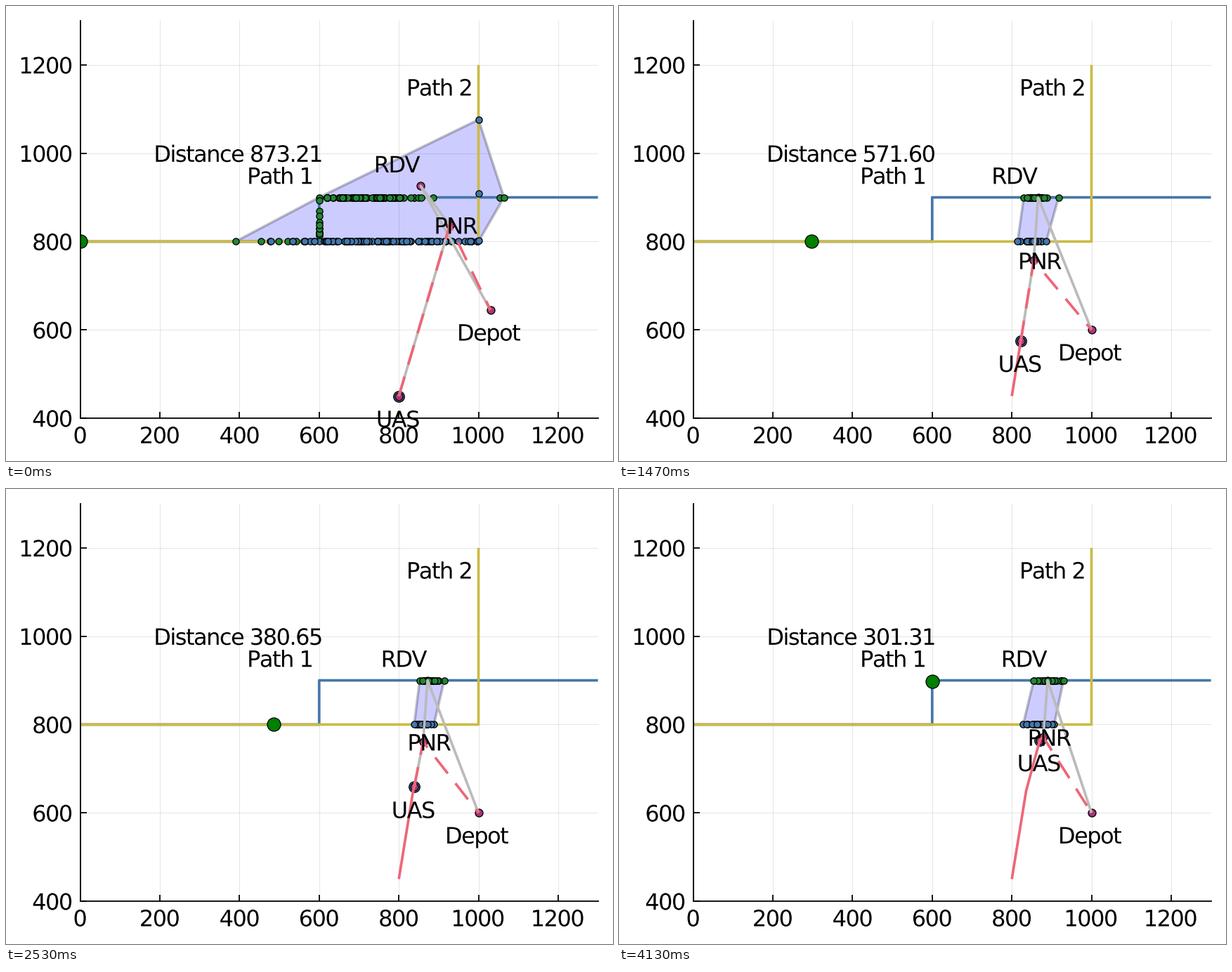
Animation of 864 by 648 pixels, one loop 4190 ms. Source, as a matplotlib script:

```python
import numpy as np
import matplotlib.pyplot as plt
from matplotlib.animation import FuncAnimation
from matplotlib.patches import PathPatch
from matplotlib.path import Path
from matplotlib.textpath import TextPath
from matplotlib.transforms import Affine2D, ScaledTranslation

LOOP_MS, FRAMES = 4190, 63
BLUE, RED, GREEN, YELLOW = "#4477AA", "#EE6677", "#228833", "#CCBB44"
PURPLE, GREY = "#AA3377", "#BBBBBB"
LW = 3.7
SIZE, TRACKING = 32, -1.5
DROP = 12.2  # from a label's middle to its baseline
SLOWDOWN = 32  # step at which both vehicles slow down

plt.rcParams["font.family"] = "DejaVu Sans"
fig = plt.figure(figsize=(12, 9), dpi=72, facecolor="white")
ax = fig.add_axes([105.6 / 864, 61 / 648, 737 / 864, 566 / 648])
ax.set(xlim=(0, 1300), ylim=(400, 1300),
       xticks=range(0, 1201, 200), yticks=range(400, 1201, 200))
ax.set_axisbelow(True)
ax.grid(color="black", alpha=0.1, lw=1)
ax.tick_params(direction="in", length=9, width=1.8,
               labelbottom=False, labelleft=False)
for side in ("top", "right"):
    ax.spines[side].set_visible(False)
for side in ("left", "bottom"):
    ax.spines[side].set_linewidth(1.8)

glyphs = {}


def glyph(char):
    """Outline and advance of one character."""
    if char not in glyphs:
        bar = TextPath((0, 0), "|", size=SIZE).get_extents().x1
        both = TextPath((0, 0), char + "|", size=SIZE).get_extents().x1
        glyphs[char] = TextPath((0, 0), char, size=SIZE), both - bar
    return glyphs[char]


def text_path(text, ha="center"):
    x, parts = 0, []
    for char in text:
        outline, advance = glyph(char)
        if char != " ":
            parts.append(outline.transformed(Affine2D().translate(x, 0)))
        x += advance + TRACKING
    path = Path.make_compound_path(*parts)
    box = path.get_extents()
    anchor = box.x1 if ha == "right" else (box.x0 + box.x1) / 2
    return path.transformed(Affine2D().translate(-anchor, 0))


class Label:
    """Letter-spaced text at a data point plus an offset in pixels."""

    def __init__(self, text, xy=(0, 0), dx=0, dy=0, ha="center"):
        self.offset = dx, dy - DROP
        self.patch = PathPatch(text_path(text, ha), fc="black", ec="none")
        self.move(xy)
        fig.add_artist(self.patch)

    def move(self, xy):
        self.patch.set_transform(
            Affine2D().translate(*self.offset).scale(1 / 72)
            + fig.dpi_scale_trans + ScaledTranslation(*xy, ax.transData))

    def write(self, text):
        self.patch.set_path(text_path(text))


def line(color, **kw):
    return ax.plot([], [], color=color, lw=LW, solid_capstyle="butt",
                   dash_capstyle="butt", solid_joinstyle="round",
                   snap=False, **kw)[0]


def dots(color, size):
    return ax.plot([], [], "o", ms=size, mfc=color, mec="black", mew=1.3,
                   snap=False)[0]


def put(artist, *points):
    artist.set_data(*np.array(points).T)


hull = ax.fill([0, 0, 0], [0, 0, 0], fc=(0, 0, 1, 0.2), ec="none", zorder=1.2)[0]
hull_edge = line("#C0C0C0", zorder=1.1)
path1, path2 = line(BLUE), line(YELLOW)
put(path1, (0, 800), (600, 800), (600, 900), (1300, 900))
put(path2, (0, 800), (1000, 800), (1000, 1200))

ship = dots("green", 19)
ring = dots(BLUE, 15.5)
marks = dots(PURPLE, 11)
greens, blues = dots(GREEN, 9.2), dots(BLUE, 9.2)
route = line(GREY)
trail = line(RED)
retreat = line(RED, linestyle=(0, (29 / LW, 17.7 / LW)))

for v in range(0, 1201, 200):
    Label(str(v), (v, 400), dy=-23.5)
    if v >= 400:
        Label(str(v), (0, v), dx=-12.5, ha="right")
Label("Path 1", (500, 950), dx=1.5)
Label("Path 2", (900, 1150), dx=1.5)
distance = Label("Distance", (400, 1000), dx=-1.4)
rdv_text = Label("RDV", dx=-32, dy=31.4)
pnr_text = Label("PNR", dx=10)
uas_text = Label("UAS", dx=-0.5, dy=-32)
depot_text = Label("Depot", dx=-1, dy=-31.4)


def travelled(step, fast, slow):
    return fast * min(step, SLOWDOWN) + slow * max(step - SLOWDOWN, 0)


def ship_at(step):
    s = travelled(step, 13.5, 8.86)
    return np.array([min(s, 600), 800 + max(s - 600, 0)])


def uas_at(step):
    y = 450 + travelled(step, 5.69, 4.42)
    return np.array([np.interp(y, (450, 650, 765), (800, 836, 870.4)), y])


def on_row(xs, y):
    return [(x, y) for x in xs]


def first_guess(rng):
    """Wide opening spread of candidate points, and its hull."""
    top = np.append(rng.normal(735, 75, 80).clip(620, 886), [600, 1053, 1064])
    side = [(600, y) for y in rng.uniform(810, 895, 11)]
    low = [390, *np.linspace(454, 565, 6)]
    row = rng.normal(750, 120, 100).clip(473, 998)
    g = on_row(top, 900) + side + on_row(low, 800)
    b = on_row(row, 800) + [(1000, 802), (1000, 909), (1000, 1076)]
    outline = [(390, 800), (600, 900), (1000, 1076), (1064, 900), (1000, 800)]
    return g, b, outline


def update(step):
    rng = np.random.default_rng(40 + step)
    target, uas = ship_at(step), uas_at(step)
    if step == 0:
        rdv, pnr, depot = (854.5, 926), (928, 837), (1030, 645)
        g, b, outline = first_guess(rng)
    else:
        drift = 0.75 * max(step - 30, 0)
        x = 866 + drift
        rdv, pnr, depot = (x, 900), (x - 11, 757 + 0.6 * drift), (1000, 600)
        top, row = rng.normal(x - 1, 17, 28), rng.normal(x - 16, 17, 28)
        g, b = on_row(top, 900), on_row(row, 800)
        outline = [(top.min(), 900), (top.max(), 900),
                   (row.max(), 800), (row.min(), 800)]

    hull.set_xy(outline)
    put(hull_edge, *outline, outline[0])
    put(greens, *g)
    put(blues, *b)
    put(ship, target)
    put(ring, uas)
    put(marks, uas, rdv, pnr, depot)
    put(route, uas, pnr, rdv, depot)
    put(retreat, uas, pnr, depot)
    put(trail, *[uas_at(k) for k in range(step + 1)])

    rdv_text.move(rdv)
    pnr_text.move(pnr)
    uas_text.move(uas)
    depot_text.move(depot)
    distance.write(f"Distance {np.hypot(*(uas - target)):.2f}")
    return []


anim = FuncAnimation(fig, update, frames=FRAMES, interval=LOOP_MS / FRAMES,
                     init_func=lambda: update(0), repeat=True, repeat_delay=0)
plt.show()
```
